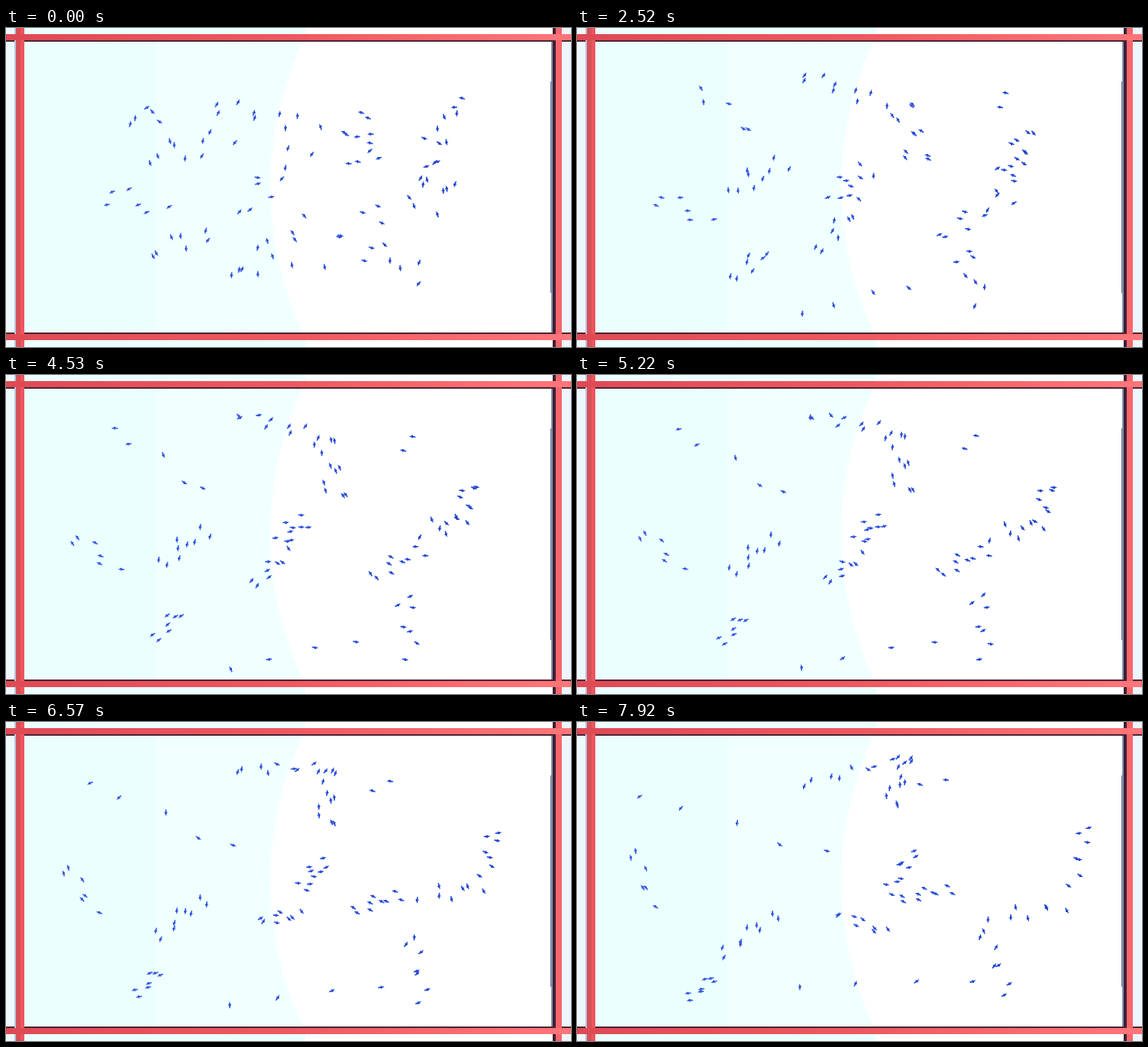
Write an HTML page with a canvas that moves like this. It is 740x418 px and loops after 8000 ms.

```html
<!DOCTYPE html>
<html lang="en">
<head>
<meta charset="utf-8">
<title>Flocking birds</title>
<style>
html, body { margin: 0; width: 100%; height: 100%; overflow: hidden; background: #fff; }
canvas { display: block; position: absolute; left: 0; top: 0; }
</style>
</head>
<body>
<canvas id="scene" width="740" height="418"></canvas>
<canvas id="birds" width="740" height="418"></canvas>
<script>
const LOOP = 8000, STEP = 134.25, LAST = 59;
const scene = document.getElementById('scene').getContext('2d');
const ctx = document.getElementById('birds').getContext('2d');

// A flock is a row of birds between two ends (x1, y1, x2, y2),
// given at the start, middle and end of the loop; birds stray from the row by spread.
const flock = (count, spread, ...rows) => ({ count, spread, rows });
const flocks = [
  flock(5, 14, [162, 118, 205, 112], [145, 68, 255, 150], [80, 95, 330, 175]),
  flock(6, 18, [130, 215, 205, 240], [92, 214, 152, 255], [74, 165, 98, 240]),
  flock(9, 18, [190, 168, 285, 145], [206, 235, 262, 195], [190, 305, 262, 250]),
  flock(7, 14, [190, 295, 268, 265], [200, 340, 236, 305], [146, 362, 182, 334]),
  flock(9, 19, [310, 238, 385, 160], [355, 215, 384, 190], [410, 222, 442, 168]),
  flock(8, 14, [302, 316, 395, 255], [322, 278, 368, 232], [340, 250, 405, 276]),
  flock(4, 5, [293, 324, 415, 310], [293, 384, 450, 345], [291, 346, 519, 338]),
  flock(9, 12, [270, 100, 402, 126], [300, 52, 402, 82], [296, 82, 428, 48]),
  flock(11, 24, [462, 118, 470, 175], [420, 86, 440, 168], [434, 42, 412, 110]),
  flock(2, 0, [597, 92, 587, 104], [541, 82, 531, 101], [483, 76, 449, 82]),
  flock(9, 16, [430, 272, 575, 200], [482, 266, 550, 228], [425, 232, 490, 218]),
  flock(7, 18, [470, 288, 545, 318], [520, 288, 530, 362], [530, 270, 568, 355]),
  flock(7, 17, [582, 112, 555, 165], [604, 142, 592, 176], [668, 135, 652, 212]),
  flock(7, 20, [555, 175, 570, 225], [592, 184, 554, 200], [639, 243, 548, 256])
];

const lerp = (a, b, t) => a + (b - a) * t;

// Parabola through three values at u = 0, 0.5 and 1
const bend = (a, b, c, u) => a + u * (4 * b - 3 * a - c) + 2 * u * u * (a - 2 * b + c);

function place({ count, spread, rows: [a, b, c] }, i, u) {
  const row = a.map((v, j) => bend(v, b[j], c[j], u));
  const along = i / (count - 1), angle = 2.4 * i + u;
  const stray = spread * (1 - .5 * u) * (.5 + .5 * Math.abs(Math.sin(i * 5)));
  return [
    lerp(row[0], row[2], along) + stray * Math.cos(angle),
    lerp(row[1], row[3], along) + stray * Math.sin(angle)
  ];
}

function poly(color, ...p) {
  ctx.fillStyle = color;
  ctx.beginPath();
  for (let i = 0; i < p.length; i += 2) ctx.lineTo(p[i], p[i + 1]);
  ctx.fill();
}

function drawBird(group, i, u) {
  const [x, y] = place(group, i, u), [nx, ny] = place(group, i, u + .01);
  const shade = x / 740;
  ctx.save();
  ctx.translate(x, y);
  ctx.rotate(Math.atan2(ny - y, nx - x));
  poly(`rgb(${95 - 50 * shade}, ${135 - 50 * shade}, ${255 - 20 * shade})`,
    4.4, 0, 1.2, -1, .2, -2.2, -1.2, -1, -4.2, -1, -4.2, .4, -.8, 1, .2, 2.2, 1.6, 1);
  poly(`rgb(${45 - 20 * shade}, ${80 - 30 * shade}, ${215 - 40 * shade})`,
    4.4, 0, 1.6, 1, .2, 2.2, -.8, 1, -4.2, .4, -1, -.2);
  ctx.restore();
}

function box(color, x, y, w, h) {
  scene.fillStyle = color;
  scene.fillRect(x, y, w, h);
}

function drawScene() {
  // Sky
  box('#fff', 0, 0, 740, 418);
  box('#ecffff', 0, 0, 392, 418);
  box('#f0ffff', 196, 17, 196, 383);
  scene.fillStyle = '#fff';
  scene.strokeStyle = 'rgba(255,255,255,.5)';
  scene.lineWidth = 4;
  scene.beginPath();
  scene.arc(797, 208, 450, 0, 7);
  scene.fill();
  scene.stroke();
  box('#eef9fd', 0, 0, 12, 418);
  box('#edf5fd', 729, 0, 11, 418);

  // Window frame
  const red = scene.createLinearGradient(0, 0, 740, 0);
  red.addColorStop(0, '#de4a54');
  red.addColorStop(.5, '#ee5860');
  red.addColorStop(1, '#ff767a');
  box('#6b7890', 713, 70, 3, 277);
  box('#8792ac', 714, 17, 2, 383);
  box('#3b2036', 716, 0, 4, 418);
  box('#4a2433', 0, 16, 740, 2);
  box('#4a2433', 0, 399, 740, 2);
  box('#b9c4dc', 11, 0, 2, 418);
  box('#d64f59', 13, 0, 6, 418);
  box('#ee555e', 19, 0, 5, 418);
  box('#f7666c', 720, 0, 8, 418);
  box(red, 0, 8, 740, 8);
  box(red, 0, 401, 740, 8);
}

function frame(now) {
  const step = Math.min(LAST, Math.floor((now % LOOP + 57) / STEP));
  ctx.clearRect(0, 0, 740, 418);
  for (const group of flocks)
    for (let i = 0; i < group.count; i++) drawBird(group, i, step / LAST);
  requestAnimationFrame(frame);
}

drawScene();
requestAnimationFrame(frame);
</script>
</body>
</html>
```
